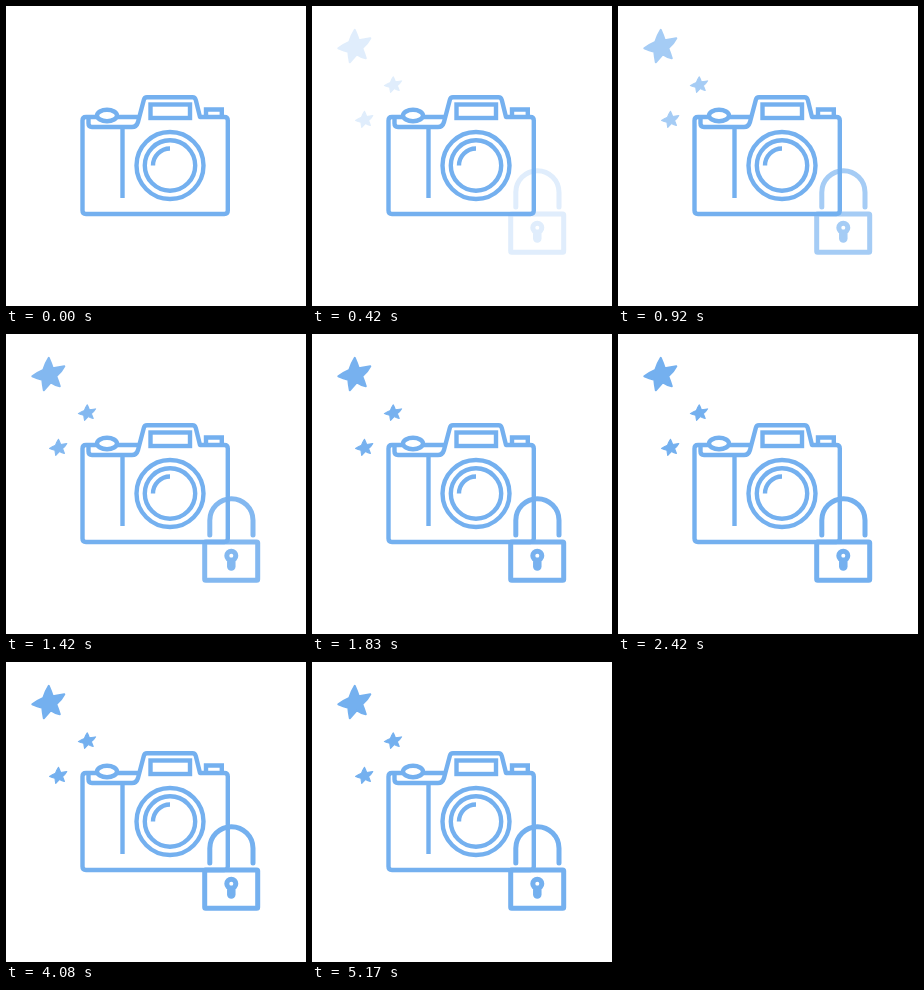
Recreate the animation shown at these times as an HTML page. Size 300 by 300 pixels, loop 6.01 s.

```html
<!DOCTYPE html>
<html lang="en">
<head>
<meta charset="utf-8">
<title>Camera with lock</title>
<style>
  html, body { margin: 0; width: 100%; height: 100%; overflow: hidden; background: #fff; }
  svg { display: block; width: 100vw; height: 100vh; }
  .line { fill: none; stroke: #74b0ef; stroke-width: 4.4; stroke-linejoin: round; }
  .sharp { stroke-linejoin: miter; }
  .solid { fill: #74b0ef; stroke: #74b0ef; stroke-width: 2; stroke-linejoin: round; }
  .extras { opacity: 0; animation: appear 6010ms infinite; }
  .lock { stroke-width: 5; stroke-linecap: round; }

  /* Stepped fade at 12 pictures a second, then a hard cut back to empty */
  @keyframes appear {
    0%      { opacity: 0;    animation-timing-function: step-end; }
    4.1%    { opacity: .07;  animation-timing-function: steps(6, jump-end); }
    12.43%  { opacity: .54;  animation-timing-function: steps(3, jump-end); }
    16.59%  { opacity: .7;   animation-timing-function: steps(7, jump-end); }
    26.25%  { opacity: .97;  animation-timing-function: steps(10, jump-end); }
    40.15%  { opacity: 1; }
    100%    { opacity: 1; }
  }
</style>
</head>
<body>
<svg viewBox="0 0 300 300">
  <defs>
    <path id="star" d="M.5-16.500Q3-11 4.500-6L16-8Q13-2 8 2Q10 7 11.500 12Q7 11 2.500 8Q-1 12-4.500 16Q-5.500 11-6 5.500Q-11 4-16 2Q-11-2-5-4.500Q-3-11 .5-16.500Z"/>
  </defs>

  <g class="line">
    <path d="M133 111H80Q76.500 111 76.500 114.500V204.500Q76.500 208 80 208H218.300Q221.800 208 221.800 204.500V114.500Q221.800 111 218.300 111H194L189.800 94Q189 91.200 186.500 91.200H141Q138.500 91.200 137.800 94L132 116Q130.500 121 126 121H86Q82.500 121 82.500 117.500V111"/>
    <ellipse cx="101" cy="109.500" rx="10" ry="5.700" fill="#fff"/>
    <path d="M116.500 121V192"/>
    <rect class="sharp" x="144.500" y="98.500" width="39.500" height="13.500"/>
    <path class="sharp" d="M200 111V103.500H215.800V111"/>
    <circle cx="164" cy="159.500" r="33.500"/>
    <circle cx="164" cy="159.500" r="25.200"/>
    <path d="M147 159.500A17 17 0 0 1 164 142.500"/>
  </g>

  <g class="extras">
    <g class="solid">
      <use href="#star" transform="translate(42.300 40.300)"/>
      <use href="#star" transform="translate(81 78.700) scale(.54 .48)"/>
      <use href="#star" transform="translate(52.200 113.500) scale(.54 .5)"/>
    </g>
    <g class="line lock">
      <path d="M203.800 201V186.300A21.600 21.600 0 0 1 247 186.300V201"/>
      <rect x="198.700" y="208" width="53" height="38.300" rx="1"/>
      <circle cx="225.300" cy="221.800" r="4.500"/>
      <path d="M225.300 228V232.500" stroke-width="8.500"/>
    </g>
  </g>
</svg>
</body>
</html>
```
